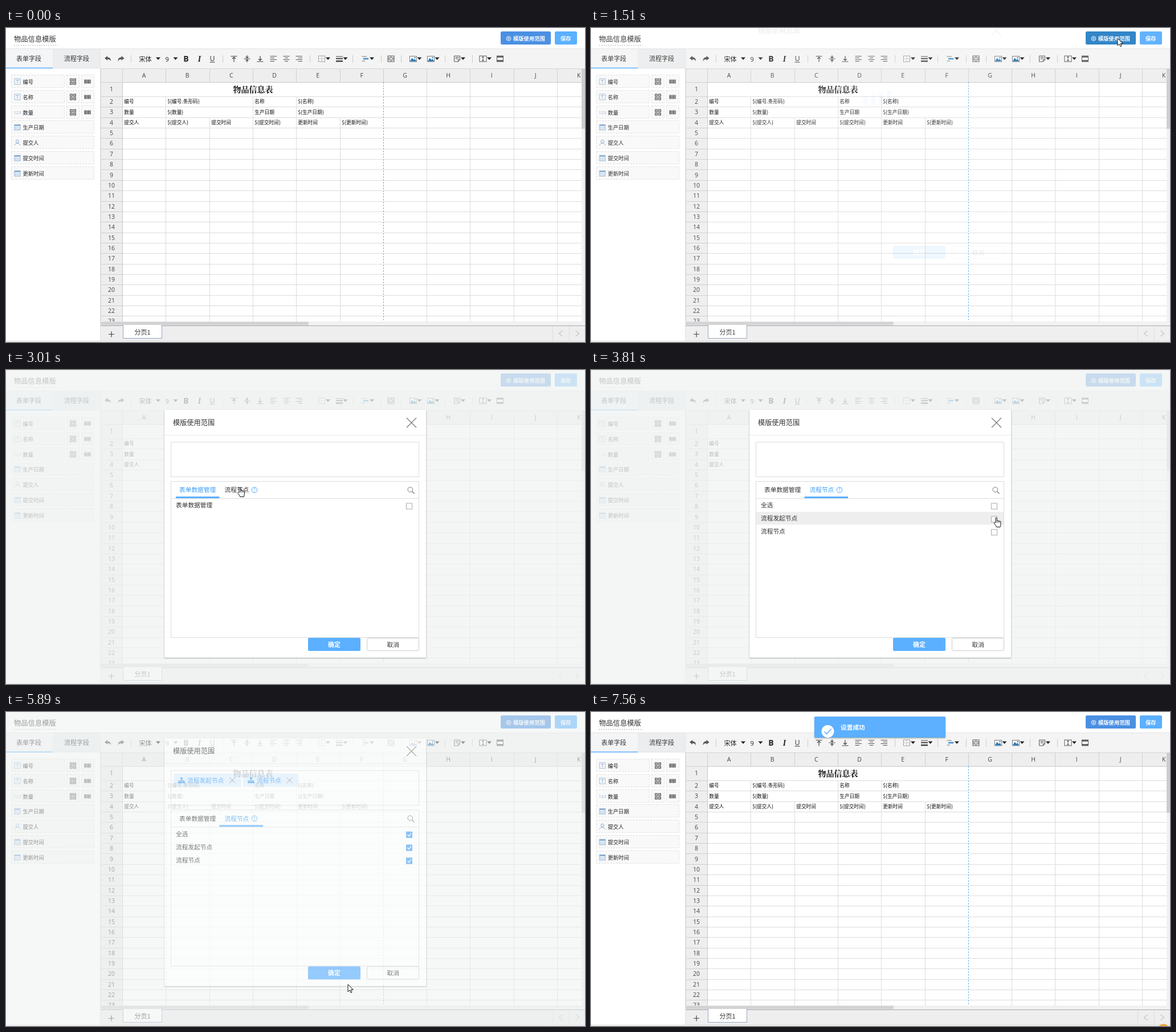
An HTML page that plays this animation: 1016 by 551 pixels, repeating every 7.64 s.

```html
<!DOCTYPE html>
<html lang="zh-CN">
<head>
<meta charset="utf-8">
<title>物品信息模版</title>
<style>
html, body { margin: 0; width: 100%; height: 100%; overflow: hidden; background: #fff; }
svg { display: block; width: 1016px; height: 551px; }
text { font-family: "Noto Sans CJK SC", "Noto Sans CJK", "Noto Sans", sans-serif; white-space: pre; }
.num { font-family: "Open Sans", "Noto Sans", sans-serif; }
.serif { font-family: "Noto Serif CJK SC", "Noto Sans CJK SC", "Noto Sans CJK", serif; }
</style>
</head>
<body>
<svg id="stage" viewBox="0 0 1016 551" xmlns="http://www.w3.org/2000/svg"></svg>
<script>
const LOOP = 7640, STEP = 79.6, LEAD = 12;
const BLUE = '#5bb0ff', INK = '#333';

// Drawing helpers: all return SVG markup
const rect = (x, y, w, h, fill, more = '') =>
  `<rect x="${x}" y="${y}" width="${w}" height="${h}" fill="${fill}" ${more}/>`;
const path = (d, stroke = '#444', w = 1, fill = 'none', more = '') =>
  `<path d="${d}" stroke="${stroke}" stroke-width="${w}" fill="${fill}" ${more}/>`;
const text = (x, cy, size, str, fill = INK, more = '') =>
  `<text x="${x}" y="${(cy + size * 0.37).toFixed(2)}" font-size="${size}" fill="${fill}" ${more}>${str}</text>`;
const group = (id, body, more = '') => `<g id="${id}" ${more}>${body}</g>`;
const at = (x, y, body) => `<g transform="translate(${x} ${y})">${body}</g>`;
const MID = 'text-anchor="middle"', BOLD = 'font-weight="700"';
const range = n => [...Array(n).keys()];

function header() {
  const gear = `<circle cx="882" cy="18.5" r="3.8" fill="none" stroke="#fff"/>
    <circle cx="882" cy="18.5" r="1.5" fill="none" stroke="#fff"/>`;
  return rect(0, 0, 1016, 36, '#fff') + path('M0 36.5H1016', '#e2e2e2')
    + text(14, 19.5, 12.3, '物品信息模版')
    + path('M14 30.5H91', '#b5b5b5', 1, 'none', 'stroke-dasharray="2 2"')
    + rect(868, 6, 88, 23, '#4a90e2', 'rx="2.5" id="scope"') + gear
    + text(890, 18.5, 9.3, '模版使用范围', '#fff', BOLD)
    + rect(963, 6, 39, 23, BLUE, 'rx="2.5"')
    + text(973, 18.5, 9.3, '保存', '#fff', BOLD);
}

const fieldIcons = {
  text: rect(-5, -5, 10, 10, 'none', 'stroke="#9fbbd8"') + path('M-2.5 -2.5H2.5M0 -2.5V3', '#8fb0d4'),
  number: text(0, 0, 7.5, '123', '#8fb0d4', MID + ' class="num"'),
  date: rect(-5, -4.5, 10, 9.5, '#eaf2fa', 'stroke="#8fb0d4"')
    + path('M-5 -3H5', '#8fb0d4', 2) + path('M-3.5 .5H4M-3.5 2.7H4', '#9fbbd8', 1, 'none', 'stroke-dasharray="1.6 1"'),
  person: '<circle cx="0" cy="-2" r="2.7" fill="none" stroke="#8fb0d4"/>' + path('M-5 5C-4 0 4 0 5 5', '#8fb0d4')
};

function sidebar() {
  const fields = [['编号', 'text'], ['名称', 'text'], ['数量', 'number'], ['生产日期', 'date'],
    ['提交人', 'person'], ['提交时间', 'date'], ['更新时间', 'date']];
  const box = (x, y, w) => rect(x + 0.5, y + 0.5, w, 22, '#f9f9f9', 'stroke="#ddd" stroke-dasharray="3 2"');
  const squares = [[-5, -5], [1, -5], [-5, 1], [1, 1]]
    .map(([x, y]) => rect(x, y, 4, 4, '#bbb', 'stroke="#555"')).join('');
  const bars = range(6).map(i => rect(-5.5 + i * 2, -3.5, i % 3 ? 1.3 : 1.7, 7, '#555')).join('');
  return rect(0, 37, 166, 512, '#fff')
    + rect(0, 37, 82, 34, '#f4f5f6') + rect(82, 37, 84, 34, '#ecedee')
    + path('M82 70.5H166', '#e2e2e2') + rect(0, 69.5, 82, 1.5, BLUE)
    + text(18, 54, 11, '表单字段') + text(102, 54, 11, '流程字段')
    + fields.map(([name, icon], i) => {
      const y = Math.round(82 + i * 26.75), mid = y + 12;
      const body = i < 3
        ? box(9, y, 93) + box(106, y, 22) + box(132, y, 22) + at(117.5, mid, squares) + at(143, mid, bars)
        : box(9, y, 145);
      return body + at(20, mid, fieldIcons[icon]) + text(29.5, mid + 0.8, 9.3, name, '#222');
    }).join('');
}

function toolbar() {
  const caret = x => path(`M${x - 4} 51.5h8l-4 4.5z`, 'none', 0, '#222');
  const icon = (x, body) => at(x, 54, body);
  const lines = (...spans) => spans.map(([a, b], i) => path(`M${a} ${-4.5 + i * 3}H${b}`, '#555')).join('');
  const image = rect(-6, -4.5, 12, 9.5, '#fff', 'stroke="#777"')
    + path('M-5.5 4.5L-2 -1.5L1 2L3 0L5.5 4.5Z', 'none', 0, '#2379b5') + rect(2, -3, 2, 2, '#2379b5');
  const turn = path('M-5.5 -1L-.5 -5V-2.5C4 -2.5 5.5 0 5.5 4.5C4 1.5 2.5 .8 -.5 .8V3Z', 'none', 0, '#555');
  return rect(166, 37, 850, 34, '#f4f4f4')
    + [219, 380, 533, 608, 658, 693, 770, 818].map(x => path(`M${x + 0.5} 47.5V61`, '#ccc')).join('')
    + icon(178.5, turn) + icon(202, `<g transform="scale(-1 1)">${turn}</g>`)
    + text(233.5, 55, 11, '宋体', '#222') + text(279.5, 54.5, 11, '9', '#222', 'class="num"')
    + [267, 297.5, 565, 595.5, 642, 725.5, 756.5, 802, 848].map(caret).join('')
    + text(316, 54.3, 14, 'B', '#222', MID + ' class="num" font-weight="700"')
    + text(339.5, 54.3, 14, 'I', '#222', MID + ' font-style="italic" font-weight="700" style="font-family:\'Liberation Serif\',serif"')
    + text(362, 53.5, 12.5, 'U', '#333', MID + ' class="num"') + path('M357.5 60H366.5', INK)
    + icon(400, path('M-5.5 -4.5H5.5M0 5.5V-3M-3 0L0 -3L3 0', '#444', 1.2))
    + icon(423, path('M-5.5 0H5.5M0 -6V-1.5M-2.5 -3.5L0 -1.5L2.5 -3.5M0 6V1.5M-2.5 3.5L0 1.5L2.5 3.5', '#444', 1.2))
    + icon(446, path('M-5.5 5H5.5M0 -5V3M-3 .2L0 3L3 .2', '#444', 1.2))
    + icon(469, lines([-5.5, 6], [-5.5, 2], [-5.5, 6], [-5.5, 2]))
    + icon(492, lines([-5.5, 5.5], [-3, 3], [-5.5, 5.5], [-3, 3]))
    + icon(514.5, lines([-6, 5.5], [-2, 5.5], [-6, 5.5], [-2, 5.5]))
    + icon(554, rect(-5.5, -5, 11, 10, '#fff', 'stroke="#999"') + path('M0 -5V5M-5.5 0H5.5', '#bbb'))
    + icon(585, path('M-6 -4H6', '#444') + path('M-6 -.3H6', '#444', 2) + path('M-6 4.2H6', '#444', 2.5))
    + icon(630, path('M-5.5 -4H3M-5.5 4H0', '#777', 1.2) + path('M-3 0H6', '#3b8fd0', 2.5))
    + icon(675.5, rect(-5.5, -5, 11, 10, 'none', 'stroke="#555"') + path('M0 -5V-2M0 2V5M-5.5 0H-1.5M5.5 0H1.5M-5 -2H5M-5 2H5', '#666'))
    + icon(714.5, image) + icon(745.5, image)
    + icon(791.5, path('M-5 -5H5V2L2 5H-5ZM2 5V2H5M-3 -2.5H3M-3 0H3', '#555'))
    + icon(837, rect(-6, -5, 12, 10, '#fff', 'stroke="#555"') + path('M0 -4V4M-2 -2L0 -4L2 -2M-2 2L0 4L2 2', '#444'))
    + icon(867, rect(-5.5, -5, 11, 10, '#fff', 'stroke="#555"') + path('M-5.5 -3.5H5.5M-5.5 3.5H5.5', '#555', 2.5));
}

function sheet() {
  const col = i => Math.round(204 + i * 76.3) + 0.5;
  const row = n => (n < 2 ? 95 : Math.round(120 + (n - 2) * 18.35)) + 0.5;
  const rowMid = n => n < 2 ? 107.5 : 129.2 + (n - 2) * 18.35;
  let out = rect(166, 71, 850, 478, '#fff') + rect(166, 71, 844, 24, '#eee') + rect(166, 95, 38, 420, '#eee');
  for (let n = 1; n < 24; n++) {
    out += path(`M204 ${row(n)}H1010`, n < 2 ? '#c8c8c8' : '#dcdcdc') + path(`M166 ${row(n)}H204`, '#cfcfcf')
      + text(185, rowMid(n), 10.5, n, '#444', MID + ' class="num"');
  }
  for (let i = 0; i < 11; i++) {
    // Merged cells: the title row, then B:C and E:F in rows two and three
    const top = i === 0 || i > 5 ? 1 : i === 2 || i === 5 ? 4 : 2;
    out += path(`M${col(i)} 71V95`, '#cfcfcf') + path(`M${col(i)} ${row(top)}V515`, i ? '#dcdcdc' : '#c8c8c8')
      + text(col(i) + 37.7, 83.5, 10.5, 'ABCDEFGHIJK'[i], '#444', MID + ' class="num"');
  }
  out += path('M166 71.5H1016M166.5 71V515', '#d4d4d4');
  out += path('M662.5 95V515', '#fff', 1) + path('M662.5 95V515', '#62b2ec', 1, 'none', 'stroke-dasharray="3 2"');
  out += text(433.5, 107.5, 14, '物品信息表', '#111', `${MID} ${BOLD} class="serif"`);
  const cells = [
    ['编号', '${编号.条形码}', '', '名称', '${名称}'],
    ['数量', '${数量}', '', '生产日期', '${生产日期}'],
    ['提交人', '${提交人}', '提交时间', '${提交时间}', '更新时间', '${更新时间}']
  ];
  cells.forEach((line, r) => line.forEach((s, c) => {
    out += text(col(c) + 2.7, rowMid(r + 2), 8.7, s, '#111');
  }));
  return `<g clip-path="url(#grid)">${out}</g>`;
}

function footer() {
  return rect(1010, 71, 6, 444, '#f1f1f1') + rect(1010, 71, 6, 106, '#cdcdcd', 'rx="1"')
    + rect(166, 515, 850, 7, '#f1f1f1') + rect(166, 515.5, 365, 6, '#d2d2d2', 'rx="2"')
    + rect(166, 522, 850, 27, '#eee') + path('M166 522.5H1016', '#9da9b5')
    + rect(205.5, 521.5, 68, 23, '#fff', 'stroke="#9aa7c0"') + rect(206, 521, 67, 2, '#fff')
    + text(225.5, 533.5, 11, '分页1')
    + path('M180 537.5H190M185 532.5V542.5', '#444', 1.2)
    + path('M959.5 523V549M988.5 523V549', '#dedede')
    + path('M976.5 531L970.5 536L976.5 541M999.5 531L1005.5 536L999.5 541', '#c6c6c6', 1.3)
    + path('M0 549.5H1016', '#d5d5d5') + rect(0, 550, 1016, 1, '#fff') + path('M165.5 37V549', '#e4e4e4');
}

const ROW_TOP = 226, ROW_H = 22.9;
const tick = (id, y) => rect(702.5, y - 4.5, 10, 10, '#fff', 'stroke="#aaa"')
  + group(id, rect(702, y - 5, 11, 11, '#4aa6fa') + path(`M704.5 ${y + .5}L707 ${y + 3}L711 ${y - 2}`, '#fff', 1.4));

function tag(id, x, w, name) {
  const org = path('M0 -2V1M-4 3V.5H4V3', '#3d9ef5')
    + [[-1.8, -5], [-5.8, 1.8], [-1.8, 1.8], [2.2, 1.8]].map(([a, b]) => rect(a, b, 3.6, 3.2, '#3d9ef5')).join('');
  const end = x + w - 15.5;
  return group(id, rect(x, 132, w, 23, '#e2f1ff', 'rx="1.5"') + at(x + 14, 143.5, org)
    + text(x + 24, 143.5, 10.7, name, '#3d9ef5')
    + path(`M${end - 5} 138.5l10 10m0 -10l-10 10`, '#888'));
}

function dialog() {
  const loader = range(4).map(i => rect(478 + i * 13.5, 207 - i * 3, 8, 17 + i * 3, BLUE, 'opacity=".5"')).join('');
  const pane = rect(289.5, 126.5, 435, 61, '#fff', 'stroke="#dcdcdc"')
    + rect(289.5, 195.5, 435, 274, '#fff', 'stroke="#dcdcdc"') + path('M290 225.5H724', '#dcdcdc')
    + rect(298, 222, 76.5, 3, BLUE, 'id="underline"')
    + text(304, 210.5, 10.7, '表单数据管理', INK, 'id="tabA"') + text(383.5, 210.5, 10.7, '流程节点', INK, 'id="tabB"')
    + '<circle cx="436" cy="210.5" r="4.8" fill="none" stroke="#4aa6fa"/>'
    + text(436, 210.5, 7.5, '?', '#4aa6fa', MID)
    + '<circle cx="709.3" cy="209.8" r="4.3" fill="none" stroke="#777"/>' + path('M712.5 213L716.5 217', '#777', 1.2)
    + rect(290, ROW_TOP, 434, 22.5, '#eee', 'id="hover"')
    + group('listA', text(298, 237.5, 10.7, '表单数据管理') + tick('none', 238.5))
    + group('listB', ['全选', '流程发起节点', '流程节点'].map((s, i) =>
      text(298, 237.5 + i * ROW_H, 10.7, s) + tick('tick' + i, 238.5 + i * ROW_H)).join(''))
    + tag('tag1', 294, 118.5, '流程发起节点') + tag('tag2', 416, 97, '流程节点');
  return rect(278, 70, 459, 434.5, '#fff', 'filter="url(#shadow)"')
    + text(293, 92.5, 12.2, '模版使用范围') + path('M703 84l17 17m0 -17l-17 17', '#777', 1.2)
    + path('M278 114.5H737', '#ececec') + group('loader', loader) + group('pane', pane)
    + rect(530, 470, 92, 23, BLUE, 'rx="2"') + text(576, 482, 10.9, '确定', '#fff', `${MID} ${BOLD}`)
    + rect(633.5, 470.5, 91, 22, '#fff', 'rx="2" stroke="#ccc"') + text(679.3, 482, 10.7, '取消', INK, MID);
}

const toast = rect(392, 8, 230, 37, BLUE, 'rx="1.5" filter="url(#shadow)"')
  + text(438, 27, 10.7, '设置成功', '#fff', BOLD)
  + '<g clip-path="url(#toastBox)"><circle cx="415.5" cy="34" r="11" fill="#fff"/>'
  + path('M409.5 34.5L413.5 38.5L421.5 29.5', BLUE, 1.6) + '</g>';

const cursor = group('arrow', path('M0 0V12.8L3 10L5 14.6L7.1 13.7L5.1 9.3H9.2Z', '#111', 1, '#fff'))
  + group('hand', path('M2.8 9V1.2a1.2 1.2 0 0 1 2.4 0V6a1.2 1.2 0 0 1 2.4 .3a1.2 1.2 0 0 1 2.3 .6a1.1 1.1 0 0 1 2.1 .9V12.2L11 16.5H4.5L3.5 14L.6 10.4C-.4 9 1.2 7.8 2.8 9Z',
    '#111', 1, '#fff') + path('M5.2 6V9M7.6 6.5V9M9.9 7V9', '#111', .8), 'transform="translate(-4 0)"');

const stage = document.getElementById('stage');
stage.innerHTML = `<defs>
  <clipPath id="grid"><rect x="166" y="71" width="844" height="444"/></clipPath>
  <clipPath id="toastBox"><rect x="392" y="8" width="230" height="37"/></clipPath>
  <filter id="shadow" x="-5%" y="-10%" width="110%" height="125%">
    <feDropShadow dx="0" dy="1" stdDeviation="1.3" flood-color="#000" flood-opacity=".35"/></filter></defs>`
  + header() + sidebar() + toolbar() + sheet() + footer()
  + rect(0, 0, 1016, 551, '#eff3f2', 'id="veil"')
  + group('dialog', dialog()) + group('toast', toast)
  + '<ellipse id="glow" cx="1004.5" cy="552" rx="7.5" ry="4.5" fill="#eda53c"/>'
  + group('cursor', cursor);

const el = {};
stage.querySelectorAll('[id]').forEach(n => { el[n.id] = n; });
const show = (id, on) => { el[id].style.display = on ? '' : 'none'; };
const set = (id, name, value) => el[id].setAttribute(name, value);

// Keys are [time, ...values], linear in between
function track(keys, t) {
  if (t <= keys[0][0]) return keys[0].slice(1);
  for (let i = 1; i < keys.length; i++) {
    const [a, b] = [keys[i - 1], keys[i]];
    if (t < b[0]) return a.slice(1).map((v, k) => v + (b[k + 1] - v) * (t - a[0]) / (b[0] - a[0]));
  }
  return keys[keys.length - 1].slice(1);
}

const MOVE = [[70, 1004, 536], [300, 975, 330], [560, 938, 110], [790, 926, 30], [1190, 924, 18], [1890, 924, 18],
  [2137, 813, 132], [2400, 590, 182], [2700, 412, 206], [3250, 408, 206], [3410, 408, 206],
  [3600, 580, 236], [3800, 711, 259], [4210, 711, 262], [4480, 708, 282], [4680, 708, 282],
  [4900, 650, 400], [5160, 600, 478], [6510, 600, 478], [6594, 613, 467], [6850, 800, 500], [7180, 1008, 553]];
// Dialog offset, dialog opacity, veil opacity
const DROP = [[1421, -108, 0, 0], [1500, -88, 0.09, 0.04], [1580, -45, 0.45, 0.35], [1660, -17, 0.8, 0.6],
  [1810, 0, 1, 0.76], [5798, 0, 1, 0.76], [5878, -23.5, 0.63, 0.56], [5958, -55, 0.32, 0.3], [6120, -108, 0, 0]];
const HAND = [[720, 1490], [2640, 3470], [3740, 4760], [5070, 5870]];

function render(time) {
  const t = Math.max(0, Math.floor((time + LEAD) / STEP) * STEP - LEAD);

  const [x, y] = track(MOVE, t);
  const hand = HAND.some(([a, b]) => t >= a && t < b);
  show('cursor', t > 60);
  show('hand', hand);
  show('arrow', !hand);
  set('cursor', 'transform', `translate(${x.toFixed(1)} ${y.toFixed(1)})`);
  set('scope', 'fill', t > 770 && t < 1730 ? '#2a80c4' : '#4a90e2');

  const [dy, alpha, veil] = track(DROP, t);
  show('dialog', alpha > 0);
  set('dialog', 'opacity', alpha);
  set('dialog', 'transform', `translate(0 ${dy})`);
  set('veil', 'opacity', veil);
  show('loader', t < 1700);
  show('pane', t >= 1700);

  const nodes = t >= 3000, first = t >= 3960, second = t >= 4600;
  set('tabA', 'fill', nodes ? INK : '#3d9ef5');
  set('tabB', 'fill', nodes ? '#3d9ef5' : INK);
  set('underline', 'x', nodes ? 374.5 : 298);
  show('listA', !nodes);
  show('listB', nodes);
  show('none', false);
  show('tick0', second);
  show('tick1', first);
  show('tick2', second);
  show('tag1', first);
  show('tag2', second);
  const line = Math.floor((y - ROW_TOP) / ROW_H);
  show('hover', nodes && line >= 0 && line < 3 && x < 724);
  set('hover', 'y', ROW_TOP + line * ROW_H);

  set('toast', 'opacity', track([[6120, 0], [6350, 1]], t)[0]);
  show('glow', t > 7540);
}

const start = performance.now();
function loop() {
  render((performance.now() - start) % LOOP);
  requestAnimationFrame(loop);
}
loop();
</script>
</body>
</html>
```
